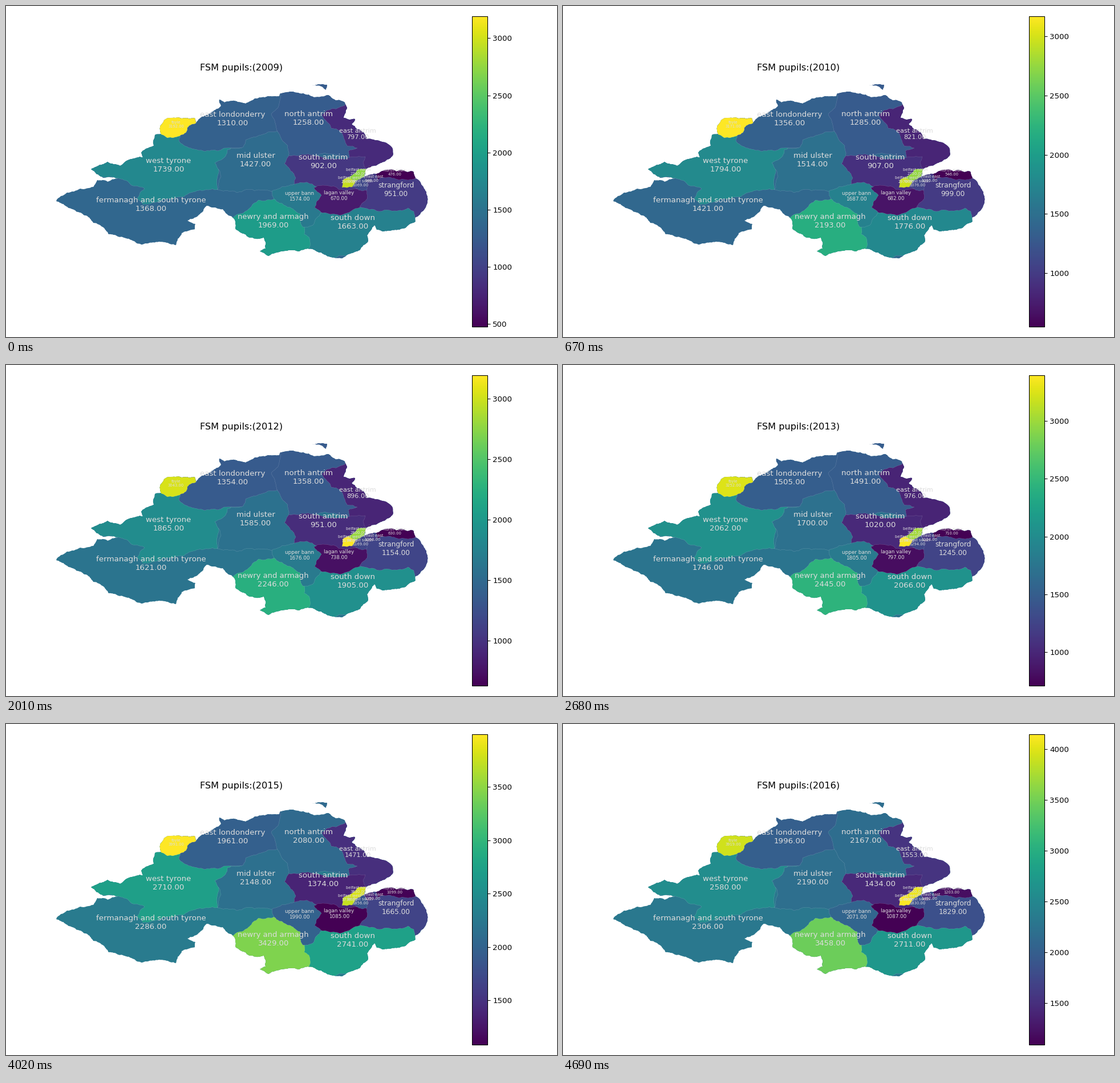
Animation, 966 px wide and 580 px high, one loop 7370 ms. Source, as a matplotlib script:

```python
import math
import random

import matplotlib.pyplot as plt
import numpy as np
from matplotlib.animation import FuncAnimation
from matplotlib.cm import ScalarMappable
from matplotlib.colors import Normalize
from matplotlib.patches import Polygon
from matplotlib.ticker import MultipleLocator

W, H, DPI = 966, 580, 64
PX = 72 / DPI          # points per pixel
BIG, TINY = 13.42, 6.71
TICKS, INTERVAL = 11, 670
FIRST_YEAR = 2009
# Where each year lies between the six counts kept for a district
STEPS = (0, 1, 1.5, 2, 2.25, 3, 4, 5)

plt.rcParams["font.family"] = "DejaVu Sans"
rng = random.Random(7)


def rugged(points, rough=0.11):
    """Closed outline through a few points, roughened by displacement."""
    line = points + points[:1]
    for _ in range(4):
        finer = [line[0]]
        for (x0, y0), (x1, y1) in zip(line, line[1:]):
            if math.hypot(x1 - x0, y1 - y0) > 3:
                k = rng.uniform(-rough, rough)
                finer.append(((x0 + x1) / 2 - k * (y1 - y0),
                              (y0 + y1) / 2 + k * (x1 - x0)))
            finer.append((x1, y1))
        line = finer
    return line


north_coast = [
    (261, 226), (272, 224), (270, 211), (277, 200), (297, 196), (331, 196),
    (333, 204), (355, 190), (377, 175), (374, 164), (383, 169), (420, 171),
    (453, 160), (479, 158), (480, 154), (521, 153), (540, 160), (565, 156),
    (594, 169), (598, 178), (592, 196), (612, 198), (606, 207), (626, 221),
    (633, 233), (676, 247), (678, 262), (655, 276), (630, 288), (628, 299),
    (636, 296), (672, 287), (714, 290), (718, 302), (739, 336), (733, 357),
    (717, 371)]
south_coast = [
    (718, 377), (690, 392), (650, 392), (646, 384), (633, 402), (635, 412),
    (620, 428), (590, 442), (560, 436), (529, 425), (513, 430), (460, 438),
    (445, 430), (455, 425), (452, 406), (425, 405), (402, 390), (400, 373),
    (380, 356), (352, 350), (318, 376), (332, 382), (331, 391), (308, 398),
    (298, 419), (279, 414), (237, 418), (207, 406), (180, 400), (172, 389),
    (153, 380), (130, 362), (104, 350), (88, 342), (130, 320), (153, 317),
    (160, 305), (196, 303), (170, 301), (149, 286), (178, 273), (200, 280),
    (240, 265), (237, 257), (259, 245)]

fig = plt.figure(figsize=(W / DPI, H / DPI), dpi=DPI, facecolor="white")
ax = fig.add_axes([0, 0, 1, 1])
ax.set(xlim=(0, W), ylim=(H, 0))
ax.axis("off")

land = Polygon(rugged(north_coast + south_coast), closed=True, lw=0)
island = Polygon(rugged([(537, 139), (563, 138), (561, 147), (556, 143)]),
                 closed=True, lw=0)
for shape in (land, island):
    ax.add_patch(shape)

districts = []


def district(name, x, y, size, counts, *corners, patches=()):
    """Paint a district over earlier ones; (x, y) centres its number.

    Corners may lie out at sea, since the coast clips every district.
    """
    patches = list(patches)
    if corners:
        patch = Polygon(rugged(list(corners)), closed=True, lw=0.4,
                        ec=(1, 1, 1, 0.3))
        ax.add_patch(patch).set_clip_path(land)
        patches.append(patch)
    label = ax.text(x, y + 0.59 * size, "", fontsize=size * PX, ha="center",
                    va="bottom", color="#dcdcdc", zorder=5)
    districts.append((name, counts, patches, label))


district("fermanagh and south tyrone", 254, 354.5, BIG,
         (1368, 1421, 1621, 2122, 2286, 2306), patches=[land])
district("west tyrone", 285, 285, BIG,
         (1739, 1794, 1865, 2653, 2710, 2580),
         (140, 303), (198, 302), (243, 320), (230, 338), (240, 348),
         (272, 341), (312, 334), (334, 324), (371, 322), (400, 230),
         (260, 200), (140, 240))
district("east londonderry", 397, 204.5, BIG,
         (1310, 1356, 1354, 1958, 1961, 1996),
         (300, 180), (303, 236), (324, 249), (357, 254), (382, 249),
         (490, 255), (490, 140), (360, 140))
district("foyle", 298, 210.5, TINY,
         (3192, 3171, 3043, 3880, 3991, 3919),
         (260, 180), (335, 185), (333, 205), (318, 213), (316, 221),
         (304, 228), (283, 231), (262, 222))
district("mid ulster", 437.5, 276, BIG,
         (1427, 1514, 1585, 2044, 2148, 2190),
         (388, 252), (385, 263), (366, 275), (377, 299), (371, 322),
         (405, 327), (466, 325), (520, 320), (510, 222), (443, 227),
         (420, 235), (416, 247))
district("north antrim", 530.5, 203.5, BIG,
         (1258, 1285, 1358, 1890, 2080, 2167),
         (479, 140), (477, 178), (465, 190), (474, 214), (480, 226),
         (494, 245), (496, 262), (620, 275), (620, 140), patches=[island])
district("east antrim", 616.5, 228.5, 11.2,
         (797, 821, 896, 1217, 1471, 1553),
         (598, 150), (594, 174), (562, 183), (554, 190), (570, 214),
         (586, 219), (598, 245), (616, 249), (600, 254), (604, 275),
         (640, 300), (700, 270), (690, 200))
district("south antrim", 556.5, 279, BIG,
         (902, 907, 951, 1228, 1374, 1434),
         (496, 262), (540, 262), (630, 264), (626, 274), (632, 287),
         (620, 325), (503, 325), (508, 301), (488, 276))
district("newry and armagh", 468.5, 383, 13.1,
         (1969, 2193, 2246, 3043, 3429, 3458),
         (470, 338), (443, 340), (425, 356), (390, 372), (390, 450),
         (535, 450), (550, 360))
district("south down", 608, 385.5, BIG,
         (1663, 1776, 1905, 2551, 2741, 2711),
         (524, 386), (523, 400), (531, 405), (527, 450), (760, 450),
         (720, 340), (553, 345))
district("upper bann", 514.5, 338, 8.9,
         (1574, 1687, 1676, 2192, 1990, 2071),
         (466, 325), (503, 313), (528, 309), (556, 330), (553, 362),
         (538, 384), (520, 387), (516, 364), (490, 350), (470, 338))
district("lagan valley", 584, 337, 8.75,
         (670, 682, 738, 975, 1085, 1087),
         (540, 318), (555, 314), (632, 320), (640, 345), (620, 353),
         (585, 367), (553, 362), (541, 353), (553, 332))
district("strangford", 683.5, 328.5, 12.1,
         (951, 999, 1154, 1517, 1665, 1829),
         (634, 290), (633, 338), (620, 352), (690, 358), (705, 354),
         (715, 360), (717, 371), (760, 371), (740, 280))
district("north down", 681.5, 294.5, TINY,
         (476, 546, 630, 950, 1099, 1203),
         (636, 280), (652, 304), (673, 300), (705, 305), (730, 301),
         (730, 280))
district("belfast east", 642, 305, TINY,
         (940, 1015, 1068, 1291, 1359, 1492),
         (628, 299), (638, 290), (652, 304), (634, 310))
district("belfast south", 621, 313.5, TINY,
         (1069, 1076, 1169, 1671, 1856, 1830),
         (607, 317), (613, 307), (628, 299), (634, 310), (632, 323))
district("belfast west", 602, 307, TINY,
         (2960, 2970, 3194, 3992, 3730, 4146),
         (600, 300), (590, 306), (589, 318), (607, 317), (613, 306))
district("belfast north", 618, 293.5, TINY,
         (2740, 2750, 2800, 3700, 3830, 4060),
         (632, 286), (616, 287), (600, 300), (613, 307), (628, 299))

title = ax.text(412.8, 112.7, "", fontsize=16.1 * PX, ha="center",
                va="baseline", color="black")

scale = ScalarMappable(Normalize(0, 1), "viridis")
cax = fig.add_axes([817 / W, 1 - 562 / H, 27 / W, 544 / H])
bar = fig.colorbar(scale, cax=cax, ticks=MultipleLocator(500))
bar.outline.set_linewidth(1.07 * PX)
cax.tick_params(labelsize=BIG * PX, length=4.7 * PX, width=1.07 * PX,
                pad=4.7 * PX)


def draw(tick):
    i = min(tick, len(STEPS) - 1)
    now = [round(np.interp(STEPS[i], range(len(counts)), counts))
           for _, counts, _, _ in districts]
    scale.set_clim(min(now), max(now))
    for count, (name, _, patches, label) in zip(now, districts):
        for patch in patches:
            patch.set_facecolor(scale.to_rgba(count))
        label.set_text(f"{name}\n{count:.2f}")
    title.set_text(f"FSM pupils:({FIRST_YEAR + i})")
    return []


anim = FuncAnimation(fig, draw, frames=TICKS, interval=INTERVAL,
                     init_func=lambda: draw(0), repeat=True)
plt.show()
```
